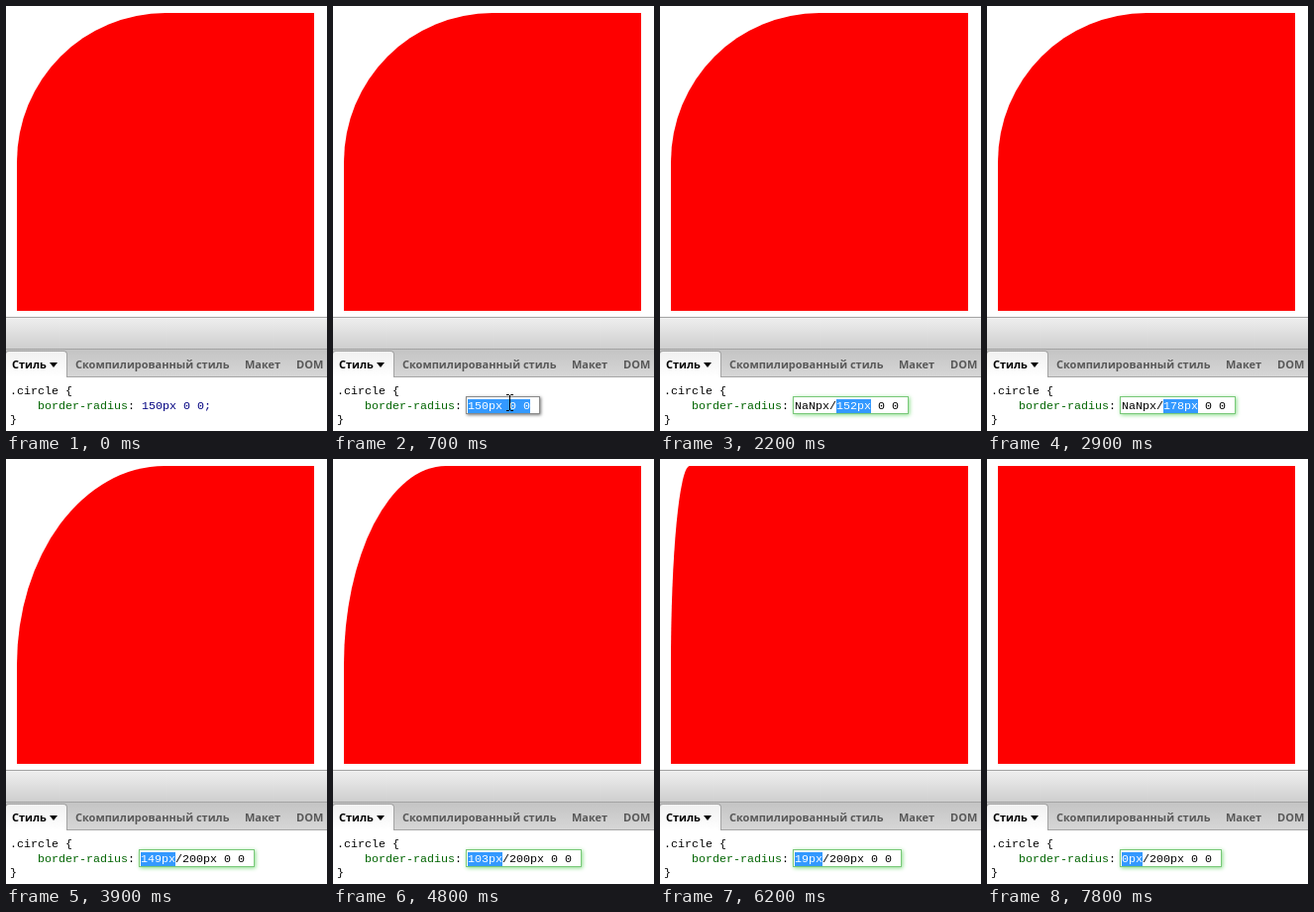
Animation of 324 by 428 pixels, one loop 7.9 s. Source, as an HTML page:

```html
<!DOCTYPE html>
<html lang="ru">
<head>
<meta charset="utf-8">
<title>border-radius</title>
<style>
html, body { margin: 0; width: 100%; height: 100%; overflow: hidden; background: #fff; }
#stage { position: relative; width: 324px; height: 428px; overflow: hidden; }
#stage > * { position: absolute; box-sizing: border-box; white-space: pre; }
#shape { left: 11px; top: 7px; width: 300px; height: 300px; background: #fe0000; }
#tools { left: 0; top: 313px; width: 324px; height: 33px; border: solid #a3a3a3; border-width: 1px 0; background: linear-gradient(#eee, #cfcfcf); }
#tabs { left: 0; top: 346px; width: 324px; height: 28px; border-bottom: 1px solid #a6a6a6; background: linear-gradient(#c4c4c4, #d6d6d6); }
#active { left: -1px; top: 347px; width: 63px; height: 27px; border: 1px solid #a3a3a3; border-bottom: 0; border-radius: 4px 4px 0 0; background: linear-gradient(#f1f1f1, #fff); }
.tab { top: 353px; font: bold 11px/16px "Open Sans", sans-serif; color: #585858; }
#arrow { left: 44px; top: 359px; border: solid transparent; border-width: 5px 4px 0; border-top-color: #000; }
.code { font: 11.667px/14px "Liberation Mono", monospace; color: #000; }
.name { color: #006400; }
#value { left: 137px; top: 396px; color: #000080; }
#edit { left: 134px; top: 393px; height: 18px; padding: 2px 9px 0 1px; border: 1px solid #8a8a8a; background: #fff; box-shadow: 1px 1px 3px #777; }
#edit.typed { border-color: #79c879; box-shadow: 1px 1px 4px #8d8; }
#edit mark { background: #3399ff; color: #fff; }
#edit i { display: inline-block; width: 1px; height: 13px; margin-right: -1px; vertical-align: top; background: #000; }
</style>
</head>
<body>
<div id="stage">
  <div id="shape"></div>
  <div id="tools"></div>
  <div id="tabs"></div>
  <div id="active"></div>
  <div class="tab" style="left:6px;color:#000">Стиль</div>
  <div id="arrow"></div>
  <div class="tab" style="left:70px">Скомпилированный стиль</div>
  <div class="tab" style="left:241px">Макет</div>
  <div class="tab" style="left:293px">DOM</div>
  <div class="code" style="left:4px;top:381px">.circle {</div>
  <div class="code" style="left:32px;top:396px"><span class="name">border-radius</span>:</div>
  <div class="code" style="left:4px;top:410px">}</div>
  <div class="code" id="value">150px 0 0;</div>
  <div class="code" id="edit"></div>
  <svg id="cursor" width="7" height="17" fill="none" stroke="#000"><path d="M0 .5H2.5L3.5 1.5L4.5 .5H7M3.5 1V16M0 16.5H2.5L3.5 15.5L4.5 16.5H7"/></svg>
</div>
<script>
const LOOP = 7900, STEP = 100;
const $ = id => document.getElementById(id);
const [shape, value, edit, cursor] = ['shape', 'value', 'edit', 'cursor'].map($);

// Linear interpolation through [step, value] points
function track(k, points) {
  let [k0, v0] = points[0];
  for (const [k1, v1] of points) {
    if (k < k1) return Math.round(v0 + (v1 - v0) * Math.max(0, k - k0) / (k1 - k0));
    [k0, v0] = [k1, v1];
  }
  return v0;
}

// Field text with its selection [from, to]; equal ends make a caret
function field(k) {
  if (k < 10) return ['150px 0 0', 0, 9];
  if (k < 20) {
    const typed = '/150px'.slice(0, k - 10);
    const at = 5 + typed.length;
    return ['150px' + typed + ' 0 0', at, at];
  }
  const rx = track(k, [[38, 150], [39, 149], [40, 149], [48, 103], [62, 19], [65, 0]]) + 'px';
  const ry = track(k, [[20, 151], [22, 152], [35, 200]]) + 'px';
  const text = rx + '/' + ry + ' 0 0';
  if (k < 37) return [text, 6, 11];
  return [text, 0, rx.length];
}

function draw(k) {
  const [text, from, to] = field(k);
  const editing = k >= 6;
  value.hidden = editing;
  edit.hidden = !editing;
  edit.className = k > 10 ? 'code typed' : 'code';
  const picked = from < to ? `<mark>${text.slice(from, to)}</mark>` : '<i></i>';
  edit.innerHTML = text.slice(0, from) + picked + text.slice(to);

  // The shape keeps its corner until the typed value is valid
  shape.style.borderRadius = k < 16 ? '150px 0 0' : text.replace(/(\/\d+px).*/, ' 0 0$1 0 0');

  cursor.style.display = k > 1 && k < 10 ? '' : 'none';
  cursor.style.left = track(k, [[1, 215], [5, 175]]) + 'px';
  cursor.style.top = track(k, [[1, 428], [5, 391]]) + 'px';
}

let last = -1;
function tick() {
  const k = Math.floor(performance.now() % LOOP / STEP);
  if (k !== last) draw(last = k);
  requestAnimationFrame(tick);
}
tick();
</script>
</body>
</html>
```
